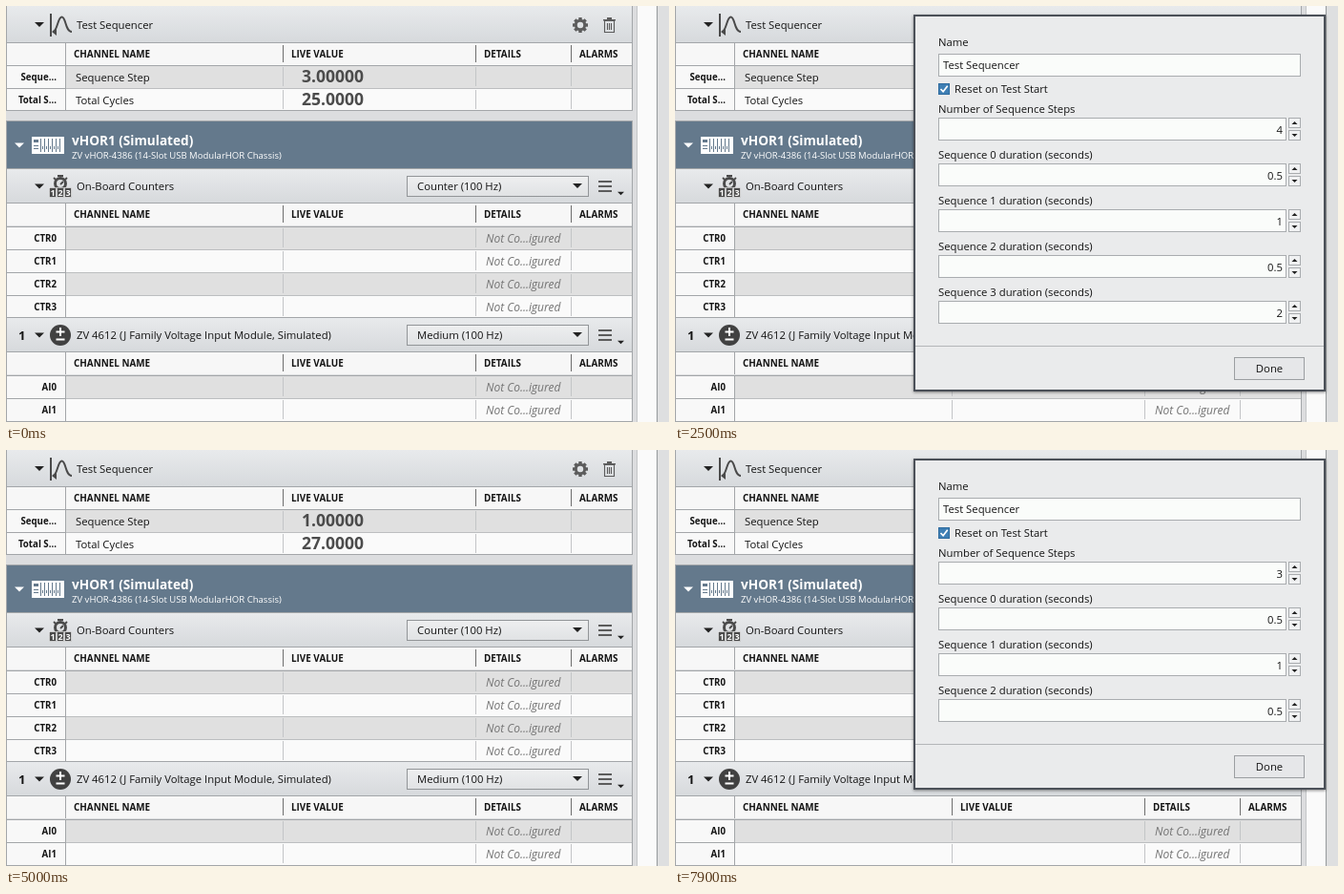
An HTML page that plays this animation: 695x436 px, repeating every 8000 ms.

```html
<!DOCTYPE html>
<html lang="en">
<head>
<meta charset="utf-8">
<title>Sequencer settings</title>
<style>
html, body { margin: 0; width: 100%; height: 100%; overflow: hidden; background: #dcdddf; }
svg { display: block; width: 695px; height: 436px; }
text { font: 11.3px "Open Sans", "Noto Sans", sans-serif; fill: #141414; white-space: pre; }
.head { font-size: 9.9px; font-weight: 700; }
.row { font-size: 9.7px; font-weight: 700; text-anchor: end; }
.live { font-size: 17.5px; font-weight: 700; fill: #4b4b4b; }
.none { font-size: 12px; font-style: italic; fill: #757575; }
.title { font-size: 13.6px; font-weight: 700; fill: #fff; }
.sub { font-size: 9.55px; fill: #fff; }
.slot { font-size: 13px; font-weight: 700; }
.end { text-anchor: end; }
.mid { text-anchor: middle; }
</style>
</head>
<body>
<svg id="stage" viewBox="0 0 695 436" xmlns="http://www.w3.org/2000/svg"></svg>
<script>
const LOOP = 8000;
const LINE = "#a3a6a9", BLUE = "#2f87bd", ICON = "#4a4a4a", BAND = "#64798c";
const stage = document.getElementById("stage");
const $ = id => document.getElementById(id);

const rect = (x, y, w, h, fill, extra = "") =>
  `<rect x="${x}" y="${y}" width="${w}" height="${h}" fill="${fill}" ${extra}/>`;
const box = (x, y, w, h, fill, stroke, extra = "") =>
  rect(x + .5, y + .5, w - 1, h - 1, fill, `stroke="${stroke}" ${extra}`);
const text = (x, y, s, cls = "", extra = "") =>
  `<text x="${x}" y="${y}" class="${cls}" ${extra}>${s}</text>`;
const path = (d, fill, extra = "") => `<path d="${d}" fill="${fill}" ${extra}/>`;
const stroke = (d, color, w = 1) => path(d, "none", `stroke="${color}" stroke-width="${w}"`);
const down = (x, y, r, fill = "#222") => path(`M${x - r} ${y - r / 2}h${2 * r}l${-r} ${r}z`, fill);
const up = (x, y, r) => path(`M${x - r} ${y + r / 2}h${2 * r}l${-r} ${-r}z`, "#222");

function tableHead(y) {
  let s = rect(0, y, 656, 24, "#f7f7f7") + rect(0, y, 656, 1, LINE);
  [["CHANNEL NAME", 71], ["LIVE VALUE", 299], ["DETAILS", 501], ["ALARMS", 601]]
    .forEach(([label, x]) => s += text(x, y + 16, label, "head"));
  for (const x of [290, 492, 592]) s += rect(x, y + 3, 1, 18, "#6e6e6e");
  return s + rect(62, y, 1, 24, LINE);
}

function tableRow(y, i, name, channel, detail) {
  let s = rect(0, y, 62, 24, "#f8f8f8") + rect(62, y, 594, 24, i % 2 ? "#fafafa" : "#e0e0e0");
  s += rect(0, y, 62, 1, LINE) + rect(62, y, 594, 1, i ? "#bcbec0" : LINE) + rect(62, y, 1, 24, LINE);
  for (const x of [290, 492, 592]) s += rect(x, y + 2, 1, 20, "#c3c5c7");
  s += text(53, y + 16, name, "row");
  if (channel) s += text(73, y + 17, channel);
  if (detail) s += text(503, y + 17, "Not Co...igured", "none");
  return s;
}

const bar = (y, h, label) =>
  rect(0, y, 656, h, "url(#bar)") + down(35, y + h / 2, 5) + text(74, y + h / 2 + 4, label);

function rateMenu(y, label) {
  let s = box(420, y, 191, 22, "url(#combo)", "#929598") + text(431, y + 15, label) + down(599, y + 10.5, 5);
  for (const dy of [5, 10, 15]) s += rect(621, y + dy, 14, 2, "#5c5c5c");
  return s + down(644.5, y + 18.5, 3.5);
}

function gear(cx, cy) {
  let s = "";
  for (let a = 0; a < 360; a += 45)
    s += `<rect x="${cx - 1.7}" y="${cy - 8}" width="3.4" height="3.5" stroke="none" transform="rotate(${a} ${cx} ${cy})"/>`;
  return `<g id="gear">${s}<circle cx="${cx}" cy="${cy}" r="4.7" fill="none" stroke-width="3"/></g>`;
}

const trash = stroke("M627.5 15.5h10v12h-10zM630.5 18v7M632.5 18v7M634.5 18v7", "#5c5c5c", 1.1) +
  rect(626, 14, 13, 1.5, "#5c5c5c") + rect(630, 12, 5, 2, "#5c5c5c");

const curve = rect(46, 8, 2, 24, ICON) +
  stroke("M49 27C54 27 54 11.5 58.5 11.5C63 11.5 62 27 69 27", ICON, 2) +
  path("M48 27l5-4v8z", ICON);

function chassis() {
  let s = rect(27, 137, 34, 18, "#fff");
  for (let i = 0; i < 6; i++) s += stroke(`M${36.5 + 4 * i} 139v14`, BAND);
  for (let i = 0; i < 5; i++) s += rect(38 + 4 * i, 147, 1, 3, BAND);
  return s + rect(29, 140, 5, 3, BAND) + rect(29, 146, 5, 1, BAND) + rect(29, 149, 5, 1, BAND);
}

function counter() {
  let s = `<circle cx="57" cy="186" r="7" fill="${ICON}"/><circle cx="57" cy="186" r="4" fill="#dfe1e3"/>` +
    rect(54, 177, 6, 2, ICON) + stroke("M57 187l3-3M50 180l2 2M64 180l-2 2", ICON, 1.8);
  for (let i = 0; i < 3; i++)
    s += box(45 + 8 * i, 190, 8, 11, ICON, "#eee", 'stroke-width=".6"') +
      text(49 + 8 * i, 199, i + 1, "mid", 'style="font-size:9px;font-weight:700;fill:#fff"');
  return s;
}

const voltage = `<circle cx="57" cy="345" r="11" fill="#414141"/>` +
  stroke("M52.5 341.5h9M57 337v9M52.5 349.5h9", "#fff", 2);

function page() {
  let s = rect(0, 0, 695, 436, "#dcdddf") + rect(662, 0, 20, 436, "#fafafa") +
    rect(661, 0, 1, 436, "#c4c6c8") + rect(682, 0, 1, 436, "#96999c") + rect(683, 0, 12, 436, "#dedfe0");
  s += bar(0, 39, "Test Sequencer") + curve + box(591, 9, 22, 22, "#deeefa", BLUE, 'id="hot"') + gear(602, 20) + trash;
  s += tableHead(38) + tableRow(62, 0, "Seque...", "Sequence Step") + tableRow(86, 1, "Total S...", "Total Cycles");
  s += text(310, 80, "", "live", 'id="step"') + text(310, 104, "", "live", 'id="cycles"') + rect(0, 109, 657, 1, LINE);
  s += box(0, 120, 657, 51, BAND, LINE) + down(14, 146, 5, "#fff") + chassis() +
    text(69, 146, "vHOR1 (Simulated)", "title") +
    text(69, 160, "ZV vHOR-4386 (14-Slot USB ModularHOR Chassis)", "sub");
  s += bar(171, 36, "On-Board Counters") + counter() + rateMenu(178, "Counter (100 Hz)") + tableHead(206);
  for (let i = 0; i < 4; i++) s += tableRow(231 + 24 * i, i, "CTR" + i, "", true);
  s += bar(327, 36, "ZV 4612 (J Family Voltage Input Module, Simulated)") + rect(0, 326, 657, 1, LINE) +
    text(13, 350, "1", "slot") + voltage + rateMenu(334, "Medium (100 Hz)") + tableHead(362);
  for (let i = 0; i < 2; i++) s += tableRow(387 + 24 * i, i, "AI" + i, "", true);
  s += rect(0, 435, 657, 1, LINE);
  for (const x of [0, 656]) s += rect(x, 0, 1, 110, LINE) + rect(x, 171, 1, 265, LINE);
  return s;
}

function spinField(y, label, value, id) {
  return text(276, y - 5, label) + box(276, y, 365, 24, "#fafcfa", "#a9acaf", `id="${id}"`) +
    text(637, y + 17, value, "end", `id="${id}Val"`) +
    box(643, y, 13, 11, "#f0f1f2", "#a9acaf", `id="${id}Up"`) + up(649.5, y + 5.5, 3) +
    box(643, y + 13, 13, 11, "#f0f1f2", "#a9acaf", `id="${id}Down"`) + down(649.5, y + 18.5, 3);
}

function dialog() {
  let s = `<g style="filter:drop-shadow(0 1px 1.5px rgba(0,0,0,.45))">` +
    `<rect id="panel" x="251" y="10" width="430" fill="#eaebec" stroke="#4b5058" stroke-width="2"/></g>`;
  s += text(276, 42, "Name") + box(276, 50, 380, 24, "#fafcfa", "#a9acaf", 'id="name"') + text(281, 66, "Test Sequencer");
  s += box(276, 81, 12, 12, "#3f7fb4", "#2f6c9f", 'id="check"') + stroke("M278.5 87l2.6 2.8 4.6-6", "#fff", 1.7) +
    text(293, 91, "Reset on Test Start");
  s += spinField(117, "Number of Sequence Steps", "4", "num");
  ["0.5", "1", "0.5", "2"].forEach((v, i) =>
    s += `<g id="row${i}">` + spinField(165 + 48 * i, `Sequence ${i} duration (seconds)`, v, "seq" + i) + "</g>");
  return s + `<g id="foot">` + rect(252, 356, 428, 1, "#b4b6b8") +
    box(586, 368, 74, 24, "#e6e7e9", "#9b9ea1") + text(623, 384, "Done", "mid") + "</g>";
}

const grad = (id, a, b) =>
  `<linearGradient id="${id}" x2="0" y2="1"><stop stop-color="${a}"/><stop offset="1" stop-color="${b}"/></linearGradient>`;

stage.innerHTML = "<defs>" + grad("bar", "#e8eaec", "#d6d9dc") + grad("combo", "#eeeff0", "#e0e2e4") + "</defs>" +
  page() + `<g id="dialog">${dialog()}</g>`;

// Each track lists [start ms, value]; the value holds until the next start.
const tracks = {
  step: [[0, 3], [800, 0], [1300, 1], [2300, 2], [2800, 3], [4800, 0], [5000, 1]],
  cycles: [[0, 25], [800, 26], [4800, 27]],
  hot: [[0, 0], [1800, 1], [5000, 0]],
  alpha: [[0, 0], [2200, .06], [2300, .13], [2400, .22], [2500, 1], [5000, 0], [5100, 1]],
  count: [[0, 4], [4700, 3]],
  rows: [[0, 4], [5000, 3]],
  hover: [[0, ""], [3300, "name"], [3400, ""], [3500, "check"], [3600, "num"], [3900, "numUp"], [4400, "numDown"],
    [6000, "num"], [6300, ""], [6400, "seq0"], [6500, ""], [6600, "seq1"], [6700, ""], [6800, "seq1"],
    [7000, "seq0"], [7100, "num"], [7300, ""], [7600, "check"], [7900, ""]],
  press: [[0, 0], [4700, 1], [4800, 0]]
};
const at = (key, t) => tracks[key].reduce((v, [start, next]) => t >= start ? next : v, null);

const hoverable = ["name", "check", "num", "numUp", "numDown", "seq0", "seq1"];

function draw(t) {
  $("step").textContent = at("step", t).toFixed(5);
  $("cycles").textContent = at("cycles", t).toFixed(4);
  const hot = at("hot", t), gearColor = hot ? "#3a86b8" : "#5c5c5c";
  $("hot").setAttribute("visibility", hot ? "visible" : "hidden");
  $("gear").setAttribute("fill", gearColor);
  $("gear").setAttribute("stroke", gearColor);

  const alpha = at("alpha", t), rows = at("rows", t), hover = at("hover", t);
  $("dialog").setAttribute("opacity", alpha);
  $("dialog").setAttribute("visibility", alpha ? "visible" : "hidden");
  $("panel").setAttribute("height", 201 + 48 * rows);
  $("row3").setAttribute("display", rows > 3 ? "inline" : "none");
  $("foot").setAttribute("transform", `translate(0 ${48 * (rows - 4)})`);
  $("numVal").textContent = at("count", t);
  for (const id of hoverable)
    $(id).setAttribute("stroke", id === hover ? BLUE : id === "check" ? "#2f6c9f" : "#a9acaf");
  for (const id of ["numUp", "numDown"])
    $(id).setAttribute("fill", id !== hover ? "#f0f1f2" : at("press", t) ? "#9ccbe8" : "#d3e9f8");
}

const begin = performance.now();
function tick() {
  draw((performance.now() - begin) % LOOP);
  requestAnimationFrame(tick);
}
tick();
</script>
</body>
</html>
```
